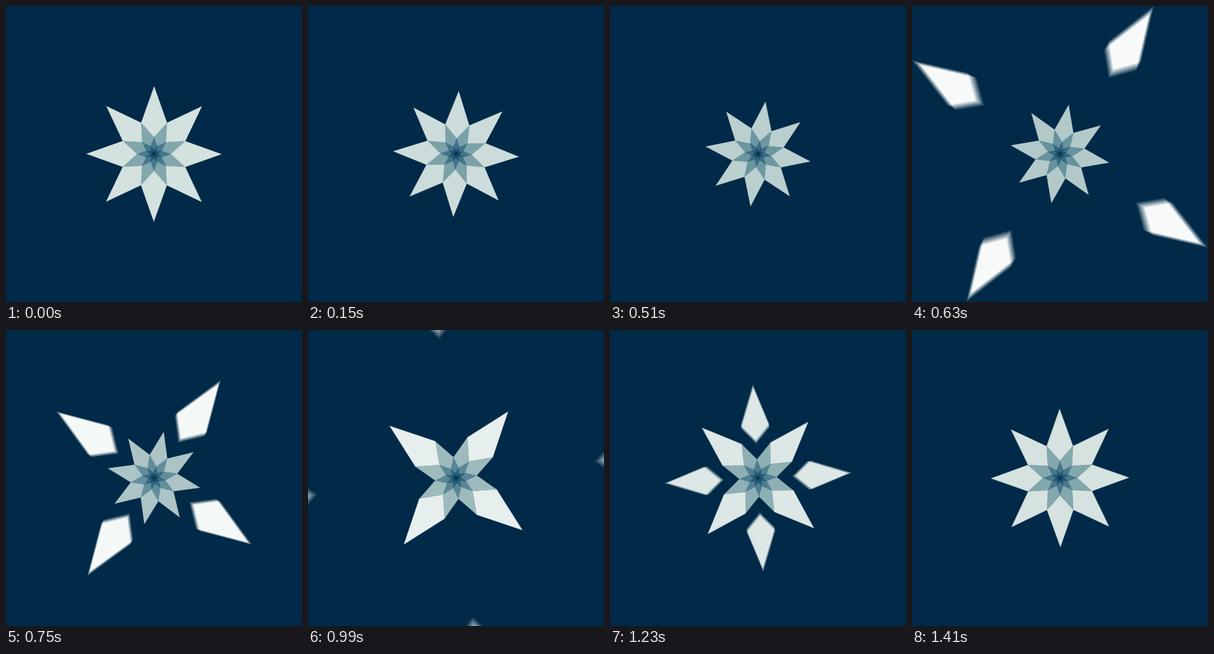
These frames come from a looping animation (500x500 px, 1440 ms). An HTML page with a canvas:

```html
<!DOCTYPE html>
<html lang="en">
<head>
<meta charset="utf-8">
<title>Folding star</title>
<style>
  html, body { margin: 0; width: 100%; height: 100%; overflow: hidden; background: #002a48; }
  canvas { display: block; width: 500px; height: 500px; }
</style>
</head>
<body>
<canvas id="stage" width="500" height="500"></canvas>
<script>
const SIZE = 500, LOOP = 1440, STEP = 30;
const SHUTTER = 18, SAMPLES = 9;
const RADIUS = 115, RINGS = 8;
const BACKGROUND = '#002a48';
const EIGHTH = Math.PI / 4;

// Ring colour by age, where each unit of age halves the radius.
const SHADES = [
  [0.4, 250, 252, 251], [0.53, 244, 248, 247], [0.77, 226, 235, 234],
  [1, 212, 226, 224], [1.36, 187, 207, 206], [1.6, 166, 192, 193],
  [2, 130, 167, 172], [3, 70, 120, 140], [4, 36, 88, 116],
  [5, 20, 66, 98], [7, 4, 46, 78]
];

const stage = document.getElementById('stage').getContext('2d');
const buffer = document.createElement('canvas');
buffer.width = buffer.height = SIZE;
const ctx = buffer.getContext('2d');

function shade(age) {
  const last = SHADES.length - 1;
  const a = Math.min(Math.max(age, SHADES[0][0]), SHADES[last][0]);
  let i = 1;
  while (i < last && SHADES[i][0] < a) i++;
  const from = SHADES[i - 1], to = SHADES[i];
  const mix = (a - from[0]) / (to[0] - from[0]);
  const rgb = [1, 2, 3].map(c => Math.round(from[c] + (to[c] - from[c]) * mix));
  return `rgb(${rgb})`;
}

// Angles run clockwise from straight up.
function polar(radius, angle) {
  return [radius * Math.sin(angle), -radius * Math.cos(angle)];
}

function fillPath(points, color) {
  ctx.beginPath();
  points.forEach(([x, y]) => ctx.lineTo(x, y));
  ctx.closePath();
  ctx.fillStyle = color;
  ctx.fill();
}

function star(radius, turn, color) {
  const points = [];
  for (let i = 0; i < 16; i++) {
    points.push(polar(i % 2 ? radius / 2 : radius, turn + i * EIGHTH / 2));
  }
  fillPath(points, color);
}

function kites(radius, turn, gap, color) {
  for (let i = 0; i < 4; i++) {
    const angle = turn + i * 2 * EIGHTH;
    const [dx, dy] = polar(gap, angle);
    const corners = [
      polar(radius, angle),
      polar(radius / 2, angle + EIGHTH / 2),
      polar(radius / 4, angle),
      polar(radius / 2, angle - EIGHTH / 2)
    ];
    fillPath(corners.map(([x, y]) => [x + dx, y + dy]), color);
    if (gap < 0.5) {
      // Closes the hairline between touching pieces.
      ctx.strokeStyle = color;
      ctx.lineWidth = 0.5;
      ctx.stroke();
    }
  }
}

function gapAt(time, arrival) {
  const left = Math.max(0, (arrival - time) / 720);
  return 1100 * Math.pow(left, 2.38);
}

function drawScene(time) {
  const p = time / LOOP;
  const zoom = Math.pow(2, -p);
  const turn = p * EIGHTH / 2;
  const outerTurn = turn + EIGHTH / 2;

  ctx.setTransform(1, 0, 0, 1, 0, 0);
  ctx.fillStyle = BACKGROUND;
  ctx.fillRect(0, 0, SIZE, SIZE);
  ctx.translate(SIZE / 2, SIZE / 2);

  const outer = 2 * RADIUS * zoom;
  kites(outer, outerTurn, gapAt(time, 960) * zoom, shade(p));
  kites(outer, outerTurn + EIGHTH, gapAt(time, 1440) * zoom, shade(p));

  for (let k = 0; k < RINGS; k++) {
    star(RADIUS * zoom / 2 ** k, turn + k * EIGHTH / 2, shade(p + 1 + k));
  }
}

// Averages several moments to give motion blur.
function render(time) {
  for (let i = 0; i < SAMPLES; i++) {
    drawScene(time + SHUTTER * i / (SAMPLES - 1));
    stage.globalAlpha = 1 / (i + 1);
    stage.drawImage(buffer, 0, 0);
  }
}

const start = performance.now();
let shown = -1;

function tick() {
  const elapsed = (performance.now() - start) % LOOP;
  const time = Math.floor(elapsed / STEP) * STEP;
  if (time !== shown) {
    render(time);
    shown = time;
  }
  requestAnimationFrame(tick);
}
tick();
</script>
</body>
</html>
```
